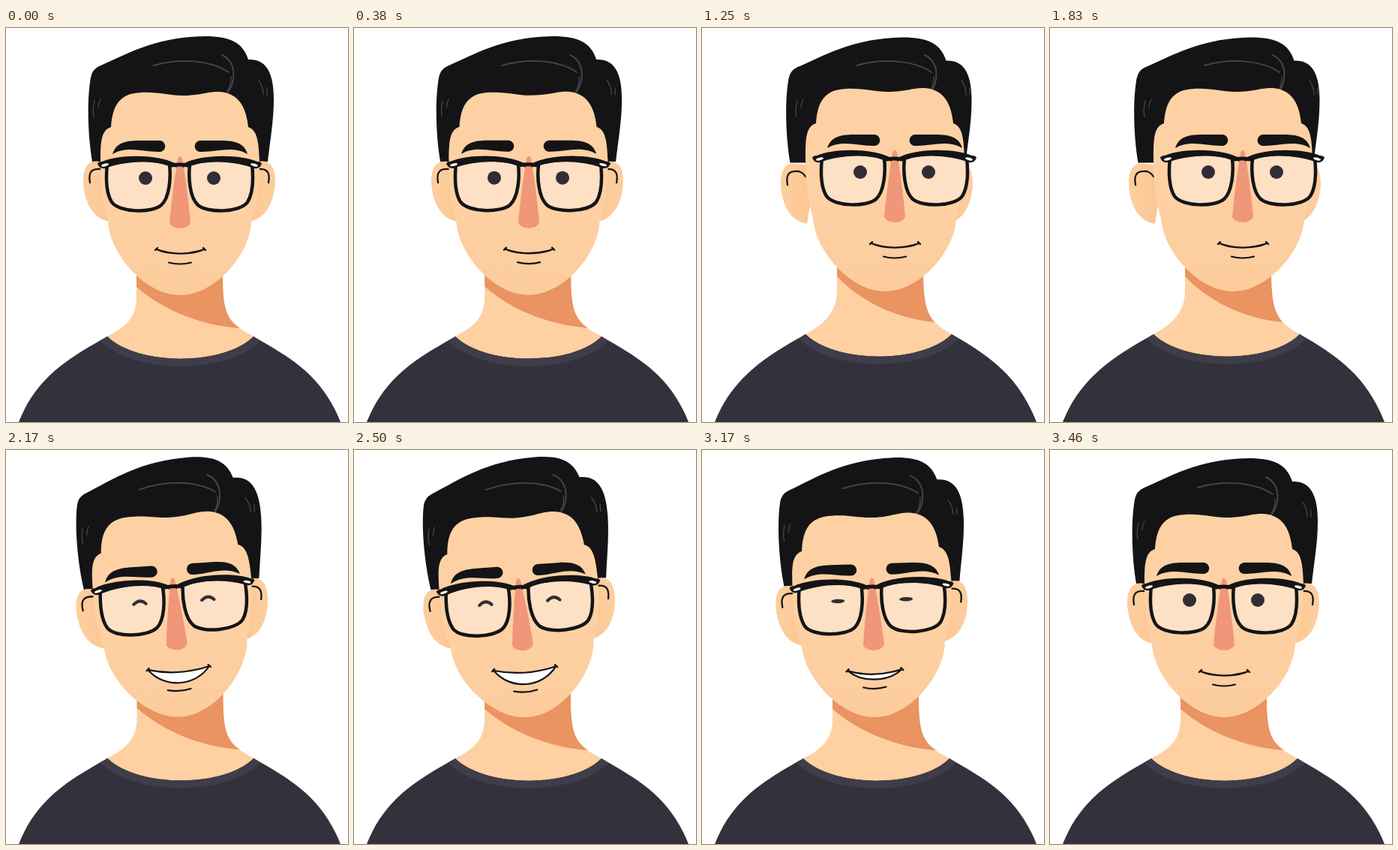
These frames come from a looping animation (456x525 px, 3500 ms). An HTML page:

```html
<!DOCTYPE html>
<html lang="en">
<head>
<meta charset="utf-8">
<title>Portrait</title>
<style>
  html, body { margin: 0; width: 100%; height: 100%; overflow: hidden; background: #fff; }
  svg { display: block; width: 456px; height: 525px; }
  .line { fill: none; stroke: #141416; stroke-linecap: round; stroke-linejoin: round; }
  .ink { fill: #141416; }
</style>
</head>
<body>
<svg viewBox="0 0 456 525">
  <defs>
    <linearGradient id="skin" x1="0" y1="0" x2="0" y2="1">
      <stop offset=".45" stop-color="#fed1a4"/>
      <stop offset="1" stop-color="#fccc9c"/>
    </linearGradient>
    <linearGradient id="earSkin" x1="0" y1="0" x2="1" y2="0">
      <stop offset=".2" stop-color="#fdcd9d"/>
      <stop offset="1" stop-color="#fac48f"/>
    </linearGradient>

    <g id="ear">
      <path fill="url(#earSkin)" d="M124 178C108 175 103 188 103 205C105 238 119 255 138 258L150 180Z"/>
      <path class="line" stroke-width="2.3" d="M112 206C109 190 116 187 127 188Q133 190 136 195"/>
    </g>
    <path id="brow" class="ink" d="M142 168C146 154 158 150 178 150H205C214 151 215 163 206 165C184 166 163 156 142 168Z"/>
    <g id="lens">
      <path class="line" stroke-width="4.5" style="fill:#fee0c4" d="M135 181C133 200 134 221 141 232C151 246 194 247 207 236C218 226 220 200 218 182C195 173 155 174 135 181Z"/>
      <path class="ink" d="M122 181Q123 178 128 178C148 169 198 167 225 180L228 186C195 175 162 177 135 186Q126 190 122 181Z"/>
      <ellipse cx="132" cy="182.5" rx="5" ry="1.7" fill="#fff" transform="rotate(-14 132 182.5)"/>
    </g>
    <g id="eye">
      <ellipse class="pupil" cx="186" cy="200" rx="9" ry="9" fill="#302d35"/>
      <path class="squint line" stroke-width="4" style="stroke:#302d35" d="M178 203Q187 195 194.5 203"/>
    </g>
  </defs>

  <path id="neck" fill="#fed0a2"/>
  <path id="shade" fill="#e99461"/>
  <path id="shirt" fill="#33313c"/>
  <path id="collar" fill="#3e3d49"/>

  <g id="head">
    <g id="hair">
      <path class="ink" d="M115 178C110 150 107 100 113 66Q115 55 124 51C165 33 200 12 265 11C300 11 316 20 323 42C346 41 357 58 357 95C357 125 352 150 349 178Z"/>
    </g>
    <g id="shine" class="line" style="stroke:#434348" stroke-width="2">
      <path d="M197 50C228 41 270 41 297 59"/>
      <path d="M288 36C308 46 307 72 294 88"/>
      <path d="M300 65Q300 78 295 84M118 97Q115 108 117 118M126 95Q123 100 123 106M337 70Q343 78 343 89M348 80V89" stroke-width="1.4"/>
    </g>
    <g id="ears">
      <use href="#ear"/>
      <use href="#ear" transform="translate(462) scale(-1 1)"/>
    </g>
    <path id="face" fill="url(#skin)" d="M126 178C126 155 126 136 140 132C142 105 150 87 180 86C205 85 215 90 235 90C260 90 270 84 285 85C308 87 320 102 323 132C336 136 337 155 338 178C338 215 333 240 327 258C326 300 280 356 232 356C185 356 138 300 136 258C130 240 126 215 126 178Z"/>
    <g id="features">
      <path fill="#ef9778" d="M229 174Q232 167 235 174C240 205 244 235 246 260Q242 267 232 267Q221 266 218 260C220 235 224 205 229 174Z"/>
      <g id="brows">
        <use href="#brow"/>
        <use href="#brow" transform="translate(464) scale(-1 1)"/>
      </g>
      <use href="#lens"/>
      <use href="#lens" transform="translate(463) scale(-1 1)"/>
      <path class="line" stroke-width="5" d="M221 183Q231 181 242 183"/>
      <use href="#eye"/>
      <use href="#eye" transform="translate(91)"/>
      <path id="mouth" class="line" stroke-width="2.2"/>
      <path id="corners" class="line" stroke-width="2.4"/>
      <path id="crease" class="line" stroke-width="2.2"/>
    </g>
  </g>
</svg>

<script>
const LOOP = 3500;
const $ = id => document.getElementById(id);
const pupil = document.querySelector('.pupil');
const squint = document.querySelector('.squint');

const ease = (t, from, to) => {
  const u = Math.min(1, Math.max(0, (t - from) / (to - from)));
  return u * u * (3 - 2 * u);
};
const mix = (a, b, k) => a + (b - a) * k;
const path = (id, d) => $(id).setAttribute('d', d);
const shift = (id, x, y) => $(id).setAttribute('transform', `translate(${x} ${y})`);

function drawBody(turn) {
  const p = (x, y) => `${x + 6 * turn} ${y - 8 * turn} `;   // neck
  const s = (x, y) => `${x + 3 * turn} ${y - 3 * turn} `;   // neckline
  path('neck', `M${p(174, 310)}L${p(174, 358)}C${p(174, 386)}${s(160, 398)}${s(135, 411)}
    L${s(180, 450)}L${s(285, 450)}L${s(330, 411)}C${s(306, 398)}${p(290, 390)}${p(289, 350)}V300Z`);
  path('shade', `M${p(174, 310)}L${p(174, 345 - 6 * turn)}C${p(208, 375)}${p(258, 396)}${p(312 - 8 * turn, 400)}
    C${p(293, 387)}${p(289, 372)}${p(289, 328)}V300Z`);
  path('shirt', `M${s(135, 411)}C${s(175, 450)}${s(290, 451)}${s(330, 411)}
    C${s(380, 440)}421 462 446 525H17C42 462 ${s(88, 438)}${s(135, 411)}Z`);
  path('collar', `M${s(135, 411)}C${s(175, 450)}${s(290, 451)}${s(330, 411)}
    L${s(339, 417)}C${s(295, 462)}${s(170, 462)}${s(126, 417)}Z`);
}

function drawMouth(smile) {
  const left = mix(201, 191, smile), right = mix(264, 274, smile);
  const y = mix(295, 291, smile), upper = mix(306, 302, smile), lower = mix(302.5, 319, smile);
  const inset = mix(16, 20, smile);
  path('mouth', `M${left} ${y}Q232 ${upper} ${right} ${y}
    C${right - inset} ${lower} ${left + inset} ${lower} ${left} ${y}Z`);
  $('mouth').style.fill = smile > .05 ? '#fff' : 'none';
  path('corners', `M${left - 2} ${y + 1}L${left + 1} ${y - 2}M${right + 2} ${y + 1}L${right - 1} ${y - 2}`);
  const c = 312.5 + 8 * smile;
  path('crease', `M${217 - smile} ${c}Q232 ${c + 4} 247 ${c}`);
}

function draw(t) {
  const tilt = ease(t, 1833, 2245) - ease(t, 2900, 3400);
  const turn = ease(t, 320, 820) - ease(t, 1833, 2245);
  drawBody(turn);
  drawMouth(tilt);
  $('head').setAttribute('transform', `translate(${-1.7 * tilt} 0) rotate(${-4 * tilt} 232 335)`);
  shift('hair', 2.5 * turn, 1.5 * turn);
  shift('shine', 9 * turn, 0);
  shift('ears', 2 * turn, 3 * turn);
  shift('face', 12 * turn, -5 * turn);
  shift('features', 25 * turn, -8 * turn);
  shift('brows', 0, 3.5 * tilt);
  const shut = tilt > .5;
  pupil.setAttribute('ry', shut ? 0 : 9 * (1 - 1.6 * tilt));
  squint.style.opacity = shut ? 1 : 0;
}

function tick() {
  draw(performance.now() % LOOP);
  requestAnimationFrame(tick);
}
tick();
</script>
</body>
</html>
```
